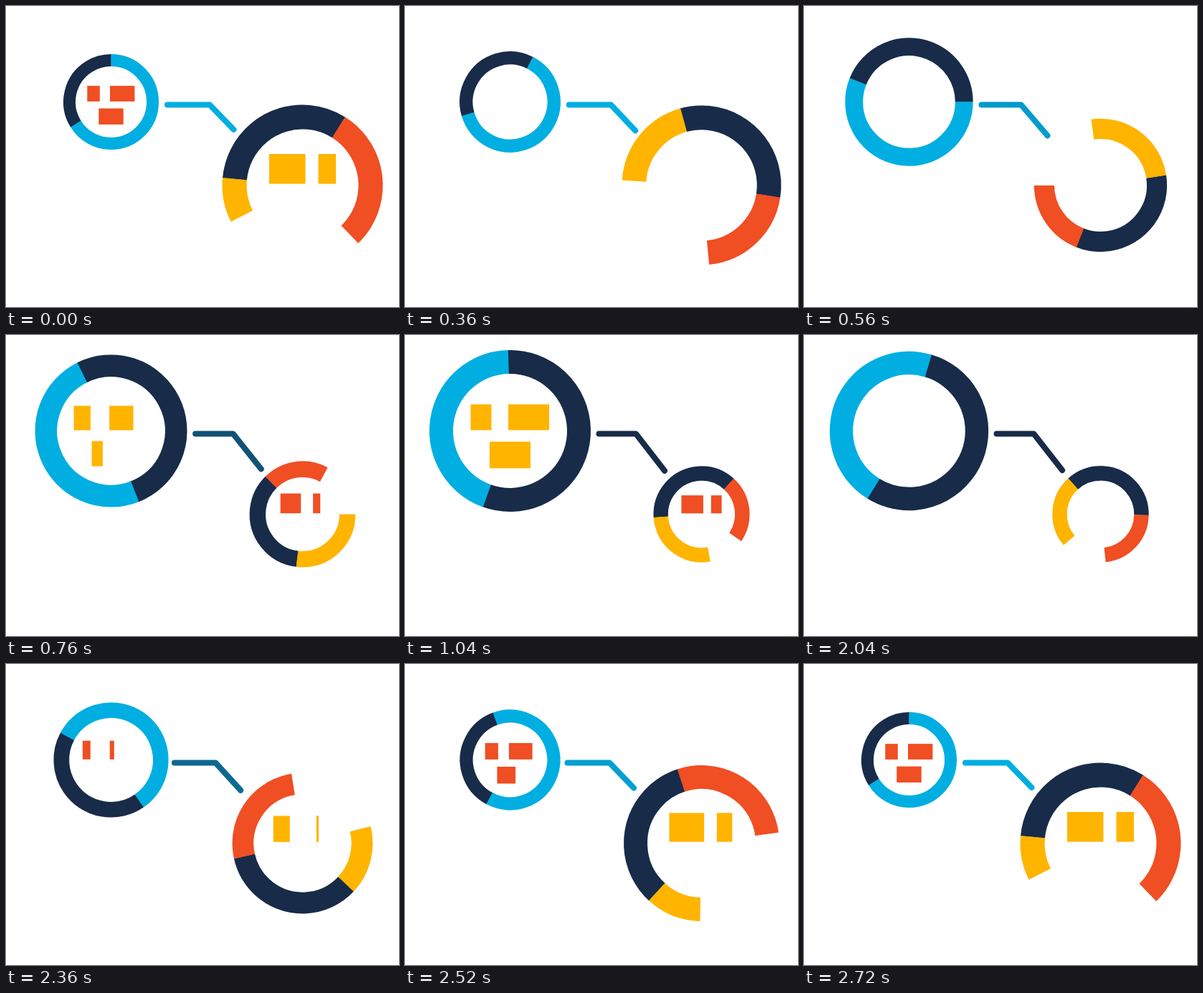
These frames come from a looping animation (548x419 px, 3360 ms). An HTML page with a canvas:

```html
<!DOCTYPE html>
<html lang="en">
<head>
<meta charset="utf-8">
<title>Linked rings</title>
<style>
  html, body { margin: 0; width: 100%; height: 100%; overflow: hidden; background: #fff; }
  canvas { display: block; }
</style>
</head>
<body>
<canvas id="stage" width="548" height="419"></canvas>
<script>
const ctx = document.getElementById('stage').getContext('2d');
const LOOP = 3360, STEP = 40;
const NAVY = '#182b49', CYAN = '#00aee1', RED = '#f04e23', GOLD = '#ffb400';
const LEFT = [146.5, 133.5], RIGHT = [413.5, 249.5];

// Offsets from the ring centre: x, y, width, height
const LEFT_BARS = [[-55, -37, 29, 36], [-2.5, -37, 57, 36], [-28.5, 15, 57, 37]];
const RIGHT_BARS = [[-46.5, -43.5, 50.5, 41.5], [22, -43.5, 24.5, 41.5]];

const SMALL = {
  left: [66.5, 17, 0.604], right: [112, 1],
  link: [225, 137.5, 284, 137.5, 317.5, 172], tint: [0, 174, 225],
  leftBar: RED, rightBar: GOLD
};
const LARGE = {
  left: [112.5, 33, 1], right: [67, 0.604],
  link: [270.5, 137.5, 322, 137.5, 362, 189], tint: [24, 43, 73],
  leftBar: GOLD, rightBar: RED
};

// Eases are [start, end, x1, x2]; edges are [from, to, ease start] in degrees
const LEGS = [
  {
    at: 40, from: SMALL, to: LARGE,
    grow: [170, 1000, .4, .4], link: [170, 1000, .4, .4], shrink: [258, 1000, .35, .35],
    leftEdges: [[0, 199.6, 94], [238, 358.7, 98]],
    rightEdges: [[243.1, 529.4, 115], [275.4, 626.2, 0], [391.9, 762, 21], [496.1, 844, 110]]
  },
  {
    at: 1720, from: LARGE, to: SMALL,
    grow: [220, 1000, .4, .4], link: [228, 921, .4, .4], shrink: [290, 1000, .35, .35],
    leftEdges: [[199.6, 360, 165], [358.7, 598, 165]],
    rightEdges: [[169.4, 603.1, 72], [266.2, 635.4, 72], [402, 751.9, 72], [484, 856.1, 80]]
  }
];

const lerp = (a, b, p) => a + (b - a) * p;
const mix = (a, b, p) => a.map((v, i) => lerp(v, b[i], p));
const ramp = (t, start, end) => Math.min(1, Math.max(0, (t - start) / (end - start)));

// Cubic bezier with control points (x1, 0) and (x2, 1)
function ease(t, [start, end, x1, x2]) {
  const x = ramp(t, start, end);
  if (x === 0 || x === 1) return x;
  let lo = 0, hi = 1;
  for (let i = 0; i < 24; i++) {
    const s = (lo + hi) / 2, r = 1 - s;
    if (3 * r * r * s * x1 + 3 * r * s * s * x2 + s * s * s < x) lo = s; else hi = s;
  }
  return lo * lo * (3 - 2 * lo);
}

const turn = (t, edges, x1, x2) =>
  edges.map(([a, b, start]) => lerp(a, b, ease(t, [start, 1000, x1, x2])));

function arc([x, y], radius, width, from, to, color) {
  const rad = d => (d - 90) * Math.PI / 180;
  ctx.beginPath();
  ctx.arc(x, y, radius - width / 2, rad(from), rad(to));
  ctx.lineWidth = width;
  ctx.lineCap = 'butt';
  ctx.strokeStyle = color;
  ctx.stroke();
}

// Share of a bar's width on show: collapses early, unfolds late
function shown(t, i, count) {
  if (t < 420) {
    const start = i === 2 ? -30 : 15 * (count - 1 - i);
    return 1 - ramp(t, start, start + 240) ** 2;
  }
  return 1 - (1 - ramp(t, 560 + 60 * i, 820 + 60 * i)) ** 2;
}

function bars([cx, cy], list, scale, color, t) {
  ctx.fillStyle = color;
  list.forEach(([x, y, w, h], i) => {
    ctx.fillRect(cx + x * scale, cy + y * scale,
      w * scale * shown(t, i, list.length), h * scale);
  });
}

function link([x1, y1, x2, y2, x3, y3], tint) {
  ctx.beginPath();
  ctx.moveTo(x1, y1);
  ctx.lineTo(x2, y2);
  ctx.lineTo(x3, y3);
  ctx.lineWidth = 8;
  ctx.lineCap = ctx.lineJoin = 'round';
  ctx.strokeStyle = `rgb(${tint.map(Math.round)})`;
  ctx.stroke();
}

function draw(time) {
  const leg = LEGS[time < LEGS[1].at ? 0 : 1];
  const t = time - leg.at, { from, to } = leg;
  const look = t < 420 ? from : to;

  ctx.fillStyle = '#fff';
  ctx.fillRect(0, 0, 548, 419);

  const [radius, width, scale] = mix(from.left, to.left, ease(t, leg.grow));
  const [a, b] = turn(t, leg.leftEdges, .4, .6);
  arc(LEFT, radius, width, b - .3, a + 360.3, NAVY);
  arc(LEFT, radius, width, a, b, CYAN);
  bars(LEFT, LEFT_BARS, scale, look.leftBar, t);

  const [size, zoom] = mix(from.right, to.right, ease(t, leg.shrink));
  const [e0, e1, e2, e3] = turn(t, leg.rightEdges, .4, .7);
  const band = size * .304;
  arc(RIGHT, size, band, e1 - .3, e2 + .3, NAVY);
  arc(RIGHT, size, band, e0, e1, GOLD);
  arc(RIGHT, size, band, e2, e3, RED);
  bars(RIGHT, RIGHT_BARS, zoom, look.rightBar, t);

  const fade = ease(t, [400, 900, 1 / 3, 2 / 3]);
  link(mix(from.link, to.link, ease(t, leg.link)), mix(from.tint, to.tint, fade));
}

const begin = performance.now();
function tick() {
  const time = (performance.now() - begin) % LOOP;
  draw(Math.floor(time / STEP) * STEP);
  requestAnimationFrame(tick);
}
tick();
</script>
</body>
</html>
```
